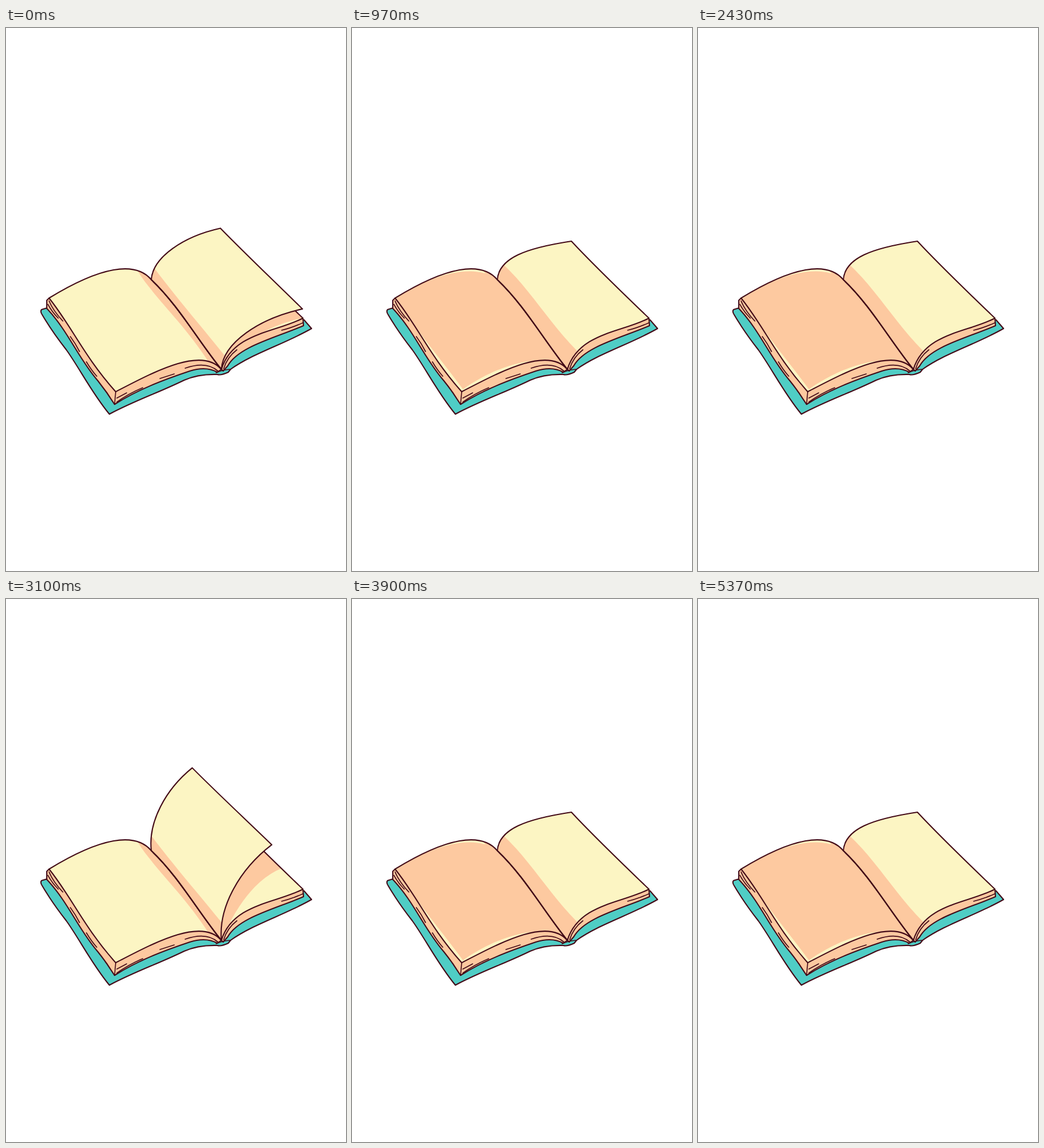
Recreate the animation shown at these times as an HTML page. Size 592 by 945 pixels, loop 5.83 s.

```html
<!DOCTYPE html>
<html lang="en">
<head>
<meta charset="utf-8">
<title>Turning pages</title>
<style>
html, body { margin: 0; width: 100%; height: 100%; overflow: hidden; background: #fff; }
svg { display: block; width: 100%; height: 100%; }
.line { fill: none; stroke: #430b18; stroke-width: 2.1; stroke-linecap: round; stroke-linejoin: round; }
.thin { stroke-width: 1.7; }
.cream { fill: #fcf5c3; }
.peach { fill: #fdc9a0; }
.teal { fill: #4fcdc5; }
</style>
</head>
<body>
<svg viewBox="0 0 592 945">
  <defs>
    <path id="left" d="M253 438C225 405 165 415 75 470C115 520 135 570 191 633C255 600 340 553 375 594C335 545 300 482 253 438Z"/>
    <path id="right" d="M253 438C256 400 303 383 382 371C420 412 470 460 517 505C470 530 395 530 375 594C335 545 300 482 253 438Z"/>
    <path id="page"/>
    <clipPath id="inLeft"><use href="#left"/></clipPath>
    <clipPath id="inRight"><use href="#right"/></clipPath>
  </defs>

  <!-- cover, then both stacks of pages; their inner corners lie under the open pages -->
  <g class="line">
    <path class="teal" d="M72 487L62 490Q59 493 63 499Q80 528 105 560C128 592 150 636 180 672C225 648 265 635 310 613Q335 602 368 603Q374 605 387 599L391 594C430 566 485 550 532 523L519 508L400 480L300 520Z"/>
    <path class="peach" d="M75 470L71 474V488C108 527 126 575 160 614Q176 634 189 655C230 629 275 612 320 597Q348 588 368 599L375 594L320 540L160 520Z"/>
    <path class="peach" d="M517 505L518 518C470 539 405 554 386 588L378 597L375 594L400 500Z"/>
  </g>

  <use href="#left" class="cream"/>
  <g class="peach" clip-path="url(#inLeft)">
    <path d="M230 424C255 465 310 515 352 580L375 600V400H230Z"/>
    <use href="#page" id="leftShade"/>
  </g>
  <use href="#left" class="line"/>

  <use href="#right" class="cream"/>
  <g class="peach" clip-path="url(#inRight)">
    <path d="M264 412C310 455 345 515 392 562V600H240V412Z"/>
    <path id="rightShade"/>
  </g>
  <use href="#right" class="line"/>

  <path class="line thin" d="M191 633L189 655M75 475Q82 492 99 510M73 481Q80 494 91 505M112 537Q121 549 128 563M140 581Q149 596 158 606M193 644L210 635M193 651Q212 637 238 626M268 610L293 602M312 592Q349 579 369 597M517 513Q497 522 480 526M379 593Q385 573 402 560M366 600Q376 595 390 594"/>

  <g id="turning">
    <use href="#page" class="cream"/>
    <path class="peach" id="strip"/>
    <use href="#page" class="line"/>
  </g>
  <path class="line" d="M253 438C300 482 335 545 375 594"/>
</svg>

<script>
const LOOP = 5830, TICK = 10 / 3, LAST = 12;
const HINGE = [253, 438], FOOT = [375, 594];
const { sin, cos, PI, min, round } = Math;
const el = id => document.getElementById(id);

const mix = (a, b, t) => a.map((v, i) => v + (b[i] - v) * t);
const polar = ([x, y], r, a) => [x + r * cos(a), y - r * sin(a)];

// cubic from the spine to a corner: bowed up at both ends of the turn, the tip lagging behind
function bend(from, to, u) {
  const dx = to[0] - from[0], dy = to[1] - from[1], mid = sin(PI * u);
  const at = (along, up) => [from[0] + along * dx + up * dy, from[1] + along * dy - up * dx];
  return [
    from,
    at(.17 + .18 * mid, .2 * cos(PI * u)),
    at(.6 + .12 * mid, .18 * cos(PI * u) + .72 * u ** 3 * mid),
    to
  ];
}

// first part of a cubic, up to t
function part([a, b, c, d], t) {
  const ab = mix(a, b, t), bc = mix(b, c, t), cd = mix(c, d, t);
  const abc = mix(ab, bc, t);
  return [a, ab, abc, mix(abc, mix(bc, cd, t), t)];
}

// area of a page from the spine out to t of its width
function leaf(top, bottom, t) {
  const [h, h1, h2, p] = part(top, t), [s, s1, s2, q] = part(bottom, t);
  const [x, y] = mix(p, q, 1 / 3);
  return `M${h}C${h1} ${h2} ${p}C${x - 7},${y - 5} ${mix(p, q, 2 / 3)} ${q}` +
    `C${s2} ${s1} ${s}C335 545 300 482 ${h}Z`;
}

function draw(k) {
  const x = k / LAST;
  const u = x + .135 * sin(PI * x ** 1.4) ** 2;
  const angle = .64 + 2.69 * u, swell = sin(PI * u);

  const corner = polar(HINGE, 150 + 31 * u + 6 * sin(2 * PI * u), angle);
  const tip = polar(FOOT, 176 + 9 * u + 20 * swell, angle - .05 * swell);
  const top = bend(HINGE, corner, u), bottom = bend(FOOT, tip, u);

  // the back of the page is all shade when edge-on and clears as it falls
  const shade = u < .55 ? .17 : min(1, .15 + .85 * ((1 - u) / .38) ** 2);
  el('page').setAttribute('d', leaf(top, bottom, 1));
  el('strip').setAttribute('d', leaf(top, bottom, shade));
  el('turning').style.display = k === LAST ? 'none' : '';

  // shadows cast on the pages that stay
  el('leftShade').setAttribute('transform', `translate(${48 * swell} ${62 * swell})`);
  const kx = 517 - 520 * u * u, ky = 505 - 55 * sin(PI * u / .62);
  el('rightShade').setAttribute('d', u > .6 ? '' :
    `M${FOOT}Q${FOOT[0] + .4 * (kx - FOOT[0])},${ky + 15} ${kx},${ky}l-150 -160L${HINGE}Z`);
}

// four turns, thirteen drawings each, held on a 30 per second grid
const steps = [];
for (let turn = 0; turn < 4; turn++)
  for (let k = 0; k <= LAST; k++) {
    const slot = round(.1 + 43.84 * turn + 2.44 * k);
    steps.push({ at: round(slot * TICK) * 10, k });
  }

let shown = -1;
function tick() {
  const t = performance.now() % LOOP;
  let k = 0;
  for (const s of steps) if (s.at <= t) k = s.k;
  if (k !== shown) draw(shown = k);
  requestAnimationFrame(tick);
}
tick();
</script>
</body>
</html>
```
